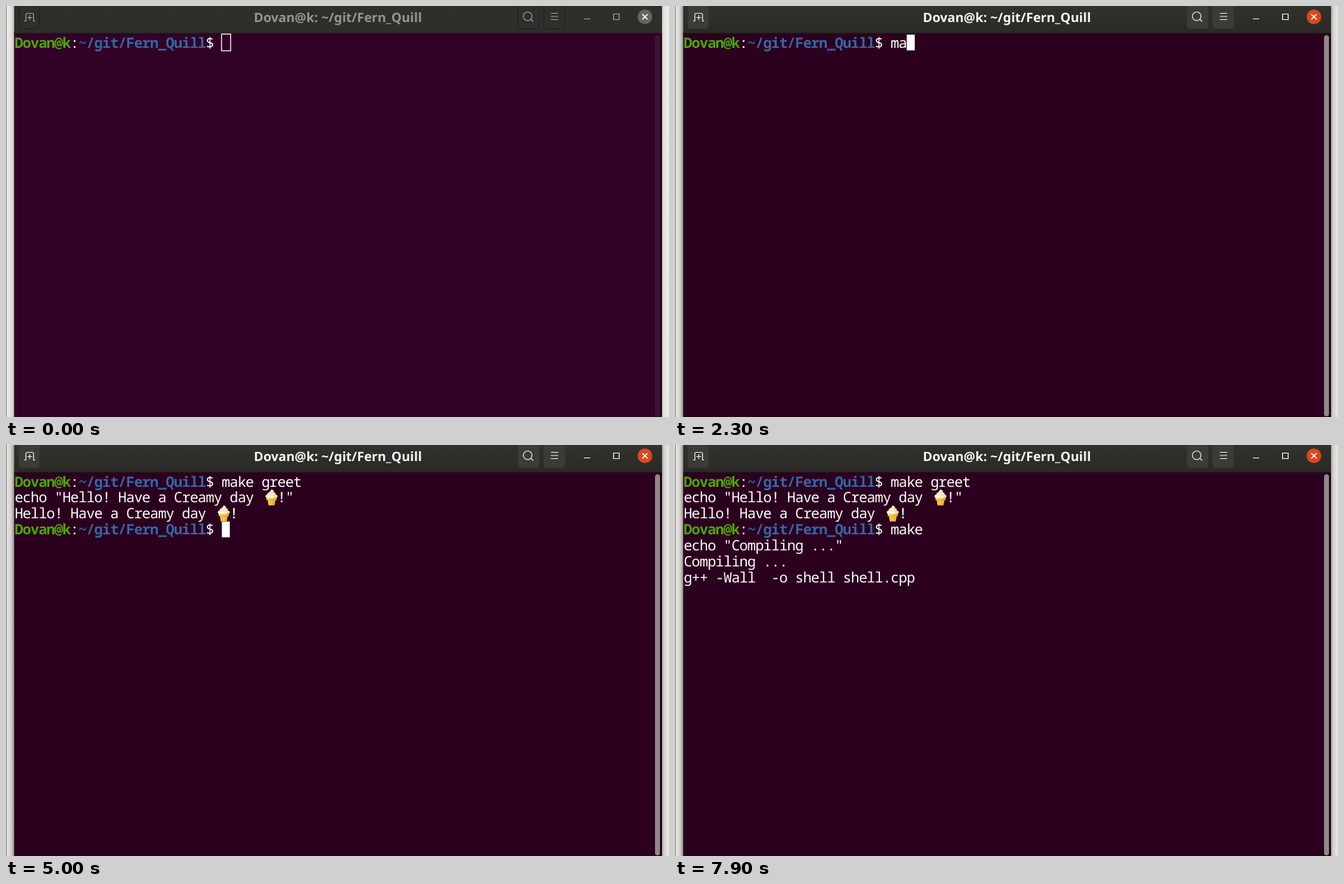
An HTML page that plays this animation: 951x589 px, repeating every 8 s.

```html
<!DOCTYPE html>
<html lang="en">
<head>
<meta charset="utf-8">
<title>Terminal</title>
<style>
  html, body { margin: 0; width: 100%; height: 100%; overflow: hidden; background: #f4f4f2; }
  svg { display: block; width: 951px; height: 589px; }
  text { white-space: pre; text-rendering: geometricPrecision; }
  #screen text { font: 20.5px "Noto Sans Mono", "DejaVu Sans Mono", monospace; letter-spacing: -.88px; fill: #fff; }
  #screen .user { font-weight: 700; fill: #4ea40a; }
  #screen .path { font-weight: 700; fill: #3865a5; }
  #title { font: 700 18.5px "Noto Sans", "Open Sans", sans-serif; text-anchor: middle; fill: #96948f; }
  .icon { fill: none; stroke: #a5a39e; stroke-width: 1.2; }
  .btn { fill: #2f2e2b; stroke: #1f1e1c; }
  .lit .btn { fill: #3c3b38; stroke: #383733; }
  .lit .icon { stroke: #f2f1ee; }
  #head { fill: url(#headIdle); }
  #body { fill: #310225; }
  #bar { fill: #3d1431; }
  #close { fill: #676562; }
  #shade { opacity: .55; }
  .focus #title { fill: #f7f6f3; }
  .focus #controls { stroke: #fff; }
  .focus #head { fill: url(#headFocus); }
  .focus #body { fill: #2b001e; }
  .focus #bar { fill: #8f8a88; }
  .focus #close { fill: #d9481f; }
  .focus #shade { opacity: 1; }
</style>
</head>
<body>
<svg id="stage" viewBox="0 0 951 589">
  <defs>
    <linearGradient id="headIdle" x2="0" y2="1">
      <stop stop-color="#302f2c"/><stop offset="1" stop-color="#2e2d2a"/>
    </linearGradient>
    <linearGradient id="headFocus" x2="0" y2="1">
      <stop stop-color="#32312d"/><stop offset="1" stop-color="#2a2926"/>
    </linearGradient>
    <linearGradient id="shadow">
      <stop stop-color="#77756a" stop-opacity=".12"/><stop offset=".6" stop-color="#77756a" stop-opacity=".28"/>
      <stop offset="1" stop-color="#66645c" stop-opacity=".65"/>
    </linearGradient>
    <linearGradient id="cream" x2="1">
      <stop stop-color="#fffdf0"/><stop offset=".6" stop-color="#fbf0cf"/><stop offset="1" stop-color="#e8d49a"/>
    </linearGradient>
    <linearGradient id="wafer" x2="1">
      <stop stop-color="#ffd95c"/><stop offset=".6" stop-color="#f6c33c"/><stop offset="1" stop-color="#dc9d26"/>
    </linearGradient>
    <g id="cone">
      <path fill="url(#wafer)" d="M-8 10H8L7 15.5H5.5L4.3 23H-4.3L-5.5 15.5H-7Z"/>
      <path fill="none" stroke="#d99a26" stroke-width=".7" d="M-7 15.4H7M-2 16V22.5M2 16V22.5"/>
      <path fill="url(#cream)" d="M-.6 0C2.8 1 3.8 2.5 3.2 4.1C5.8 4.6 6.2 6 5.6 7.2C8.5 7.8 9.4 10 8 11.3C5 12.8-5 12.8-8 11.3C-9.4 10-8.5 7.8-5.8 7.2C-6.2 5.6-5 4.4-3 4.1C-2.8 2.4-.2 2.3-.6 0Z"/>
      <path fill="none" stroke="#dcc48a" stroke-width=".7" d="M-3 4.3Q1 5.4 3.2 4.1M-5.7 7.4Q1 9.2 5.6 7.2"/>
    </g>
  </defs>

  <rect width="951" height="589" fill="#f8f8f6"/>
  <g id="shade" fill="url(#shadow)">
    <rect width="11.5" height="589"/>
    <rect width="11" height="589" transform="matrix(-1 0 0 1 951 0)"/>
  </g>
  <rect width="1" height="589" fill="#82817d"/>

  <rect id="body" x="11.5" y="38" width="929.5" height="551"/>
  <rect id="head" x="11.5" width="929.5" height="39"/>
  <path d="M11.5 39H941" stroke="#211d1e"/>
  <path d="M940.5 39V589" stroke="#1c0616"/>
  <rect id="bar" x="931" y="42" width="7" height="546" rx="3.5"/>

  <text id="title" x="476" y="23"></text>
  <g id="tools">
    <rect class="btn" x="18.5" y="-6" width="29.5" height="38.5" rx="4"/>
    <rect class="btn" x="734.5" y="-6" width="30" height="38.5" rx="4"/>
    <rect class="btn" x="771.5" y="-6" width="30" height="38.5" rx="4"/>
    <path class="icon" d="M26 21.5H28.5V12.5Q28.5 10.5 30.5 10.5H37.5Q39.5 10.5 39.5 12.5V21.5H42M34 13V20M30.5 16.5H37.5"/>
    <path class="icon" d="M753 19.2L756.3 22.3"/>
    <circle class="icon" cx="748.3" cy="14.7" r="6.2"/>
    <path class="icon" d="M781.5 10.5H792M781.5 15H792M781.5 19.5H792"/>
  </g>
  <path id="controls" class="icon" d="M829 18.5H838M871.5 11.5H879.5V19.5H871.5Z"/>
  <circle id="close" cx="916.5" cy="15.5" r="10.5"/>
  <path d="M912.7 11.7L920.3 19.3M920.3 11.7L912.7 19.3" stroke="#fff" stroke-width="1.6"/>

  <g id="screen"></g>
  <rect id="cursor"/>
  <path id="arrow" d="M0 0V16L3.8 12.6L6.3 18L8.8 16.9L6.4 11.6H11.3Z" fill="#222" stroke="#fff"/>
  <g id="beam" fill="none">
    <path id="beamEdge" d="M-3 -8H-1Q0 -8 0 -7V7Q0 8 -1 8H-3M3 -8H1Q0 -8 0 -7V7Q0 8 1 8H3" stroke="#fff" stroke-width="3" stroke-linecap="square"/>
    <path d="M-3 -8H-1Q0 -8 0 -7V7Q0 8 -1 8H-3M3 -8H1Q0 -8 0 -7V7Q0 8 1 8H3" stroke="#222" stroke-width="1.1"/>
  </g>
</svg>
<script>
const LOOP = 8000, CELL = 11.42, LINE = 22.9, LEFT = 12.4, TOP = 41;
const USER = 'Dovan@k', DIR = '~/git/Fern_Quill';
const START = USER.length + DIR.length + 3;
const $ = id => document.getElementById(id);
const colX = c => LEFT + c * CELL;
const rowY = r => TOP + r * LINE;

// [time, typed text]
const first = [[0, ''], [2200, 'm'], [2300, 'ma'], [2500, 'mak'], [2600, 'make'], [3000, 'make '],
  [3400, 'make g'], [3500, 'make gr'], [4000, 'make greet'], [4100, 'make greet ']];
const second = [[0, ''], [6600, 'm'], [6700, 'ma'], [7100, 'make']];
// [time, cursor visible]
const blink = [[0, 1], [5100, 0], [5700, 1], [6300, 0], [6500, 1], [7900, 0]];
// [time, pointer, x, y]
const pointer = [[0, ''], [1200, 'arrow', 372, 3], [1300, 'beam', 369, 60], [1400, 'beam', 367.5, 88], [1900, '']];
const GREET = 5000, BUILD = 7500, FILL = 1600, FOCUS = 1700, LIT = 1900;

const at = (table, t) => table.findLast(step => step[0] <= t);

function make(tag, attrs, parent) {
  const el = document.createElementNS('http://www.w3.org/2000/svg', tag);
  for (const key in attrs) el.setAttribute(key, attrs[key]);
  return parent.appendChild(el);
}

function write(parent, col, row, str, cls = '') {
  const el = make('text', { x: colX(col), y: rowY(row) + 18.5, class: cls }, parent);
  el.textContent = str;
  return el;
}

function prompt(parent, row) {
  const n = USER.length;
  write(parent, 0, row, USER, 'user');
  write(parent, n, row, ':');
  write(parent, n + 1, row, DIR, 'path');
  write(parent, START - 2, row, '$');
  return write(parent, START, row, '');
}

function creamy(parent, row, before, after) {
  const col = before.length;
  write(parent, 0, row, before);
  make('use', { href: '#cone', x: colX(col) + 14.5, y: rowY(row) - .3 }, parent);
  write(parent, col + 2, row, after);
}

const screen = $('screen');
const input1 = prompt(screen, 0);
const greet = make('g', {}, screen);
creamy(greet, 1, 'echo "Hello! Have a Creamy day ', '!"');
creamy(greet, 2, 'Hello! Have a Creamy day ', '!');
const input2 = prompt(greet, 3);
const build = make('g', {}, screen);
['echo "Compiling ..."', 'Compiling ...', 'g++ -Wall  -o shell shell.cpp']
  .forEach((line, i) => write(build, 0, 4 + i, line));
$('title').textContent = USER + ': ' + DIR;

const show = (el, on) => el.setAttribute('visibility', on ? 'visible' : 'hidden');

function setCursor(t, row, col) {
  const hollow = t < FILL, box = hollow
    ? { x: colX(col) - .1, y: rowY(row) - .8, width: 13, height: 24 }
    : { x: colX(col) + .3, y: rowY(row), width: 11.4, height: 22.6 };
  const style = { fill: hollow ? 'none' : '#fff', stroke: hollow ? '#fff' : 'none', 'stroke-width': 1.3 };
  for (const [key, value] of Object.entries({ ...box, ...style })) $('cursor').setAttribute(key, value);
  show($('cursor'), at(blink, t)[1]);
}

function draw(t) {
  const cmd1 = at(first, t)[1], cmd2 = at(second, t)[1];
  input1.textContent = cmd1;
  input2.textContent = cmd2;
  show(greet, t >= GREET);
  show(build, t >= BUILD);
  if (t >= BUILD) setCursor(t, 7, 0);
  else if (t >= GREET) setCursor(t, 3, START + cmd2.length);
  else setCursor(t, 0, START + cmd1.length);

  $('stage').classList.toggle('focus', t >= FOCUS);
  $('tools').classList.toggle('lit', t >= LIT);

  const [, kind, x, y] = at(pointer, t);
  for (const id of ['arrow', 'beam']) {
    show($(id), id === kind);
    if (id === kind) $(id).setAttribute('transform', `translate(${x} ${y})`);
  }
}

const begin = performance.now();
function tick() {
  draw((performance.now() - begin) % LOOP);
  requestAnimationFrame(tick);
}
tick();
</script>
</body>
</html>
```
